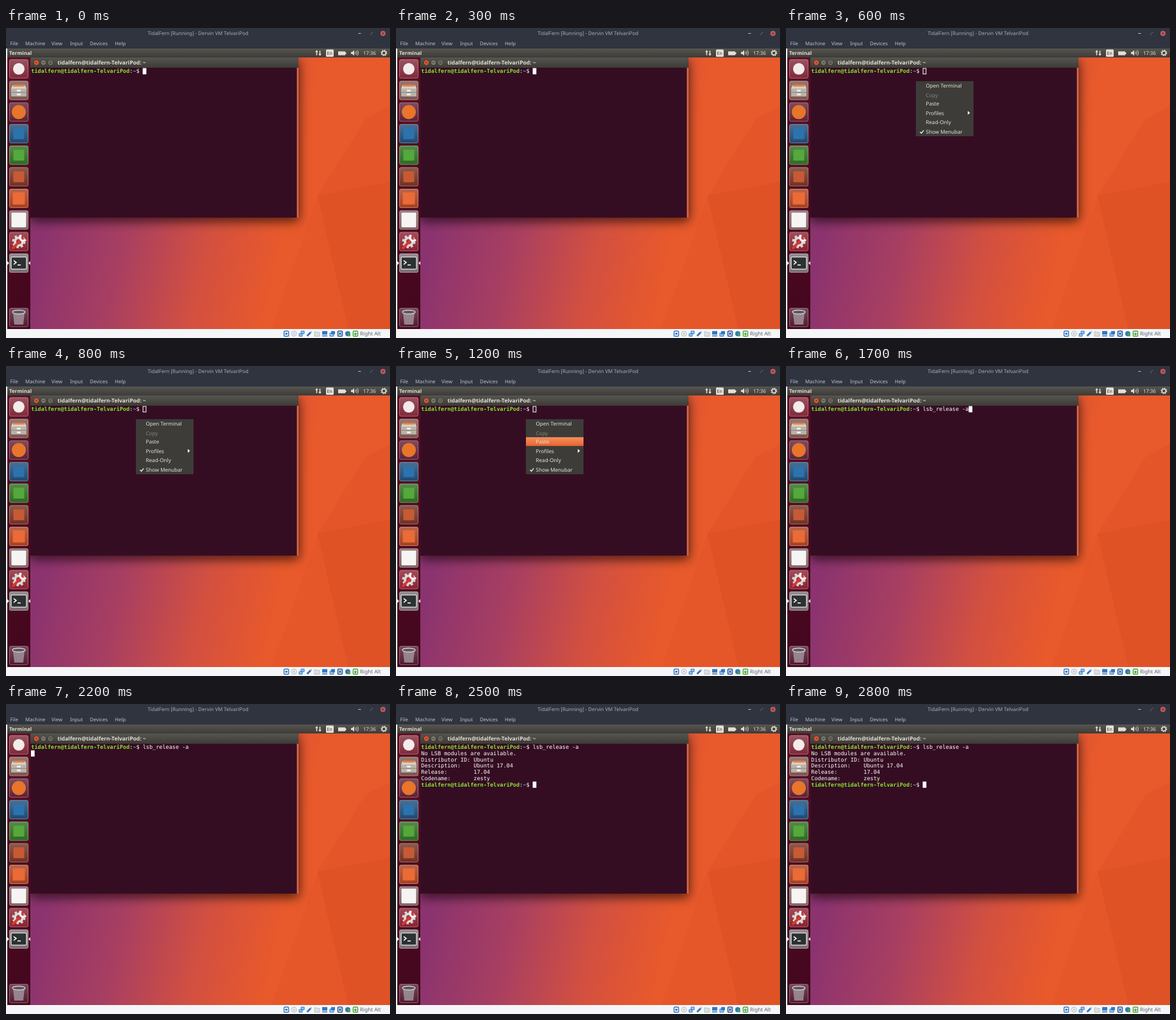
Recreate the animation shown at these times as an HTML page. Size 600 by 484 pixels, loop 2900 ms.

```html
<!DOCTYPE html>
<html lang="en">
<head>
<meta charset="utf-8">
<title>Terminal paste</title>
<style>
html, body { margin: 0; width: 100%; height: 100%; overflow: hidden; background: #f5f6f7; }
svg { display: block; }
text { font: 7.85px "Noto Sans", sans-serif; text-rendering: geometricPrecision; white-space: pre; }
.bold { font-weight: 700; }
#lines text { font: 8.53px "DejaVu Sans Mono", monospace; fill: #fff; }
#lines .user { font-weight: 700; fill: #8ae234; }
#lines .path { font-weight: 700; fill: #729fcf; }
#menu text { font-size: 8.1px; fill: #e6e2da; }
</style>
</head>
<body>
<svg width="600" height="484" viewBox="0 0 600 484">
  <defs>
    <linearGradient id="sky" gradientUnits="userSpaceOnUse" x1="40" y1="390" x2="400" y2="470">
      <stop stop-color="#8b336f"/><stop offset=".35" stop-color="#a83f61"/>
      <stop offset=".7" stop-color="#d35040"/><stop offset="1" stop-color="#e8592b"/>
    </linearGradient>
    <linearGradient id="dock" x2="0" y2="1">
      <stop stop-color="#5e0f22"/><stop offset=".5" stop-color="#4d0a20"/><stop offset="1" stop-color="#43071e"/>
    </linearGradient>
    <linearGradient id="bar" x2="0" y2="1"><stop stop-color="#575550"/><stop offset="1" stop-color="#3d3b37"/></linearGradient>
    <linearGradient id="hot" x2="0" y2="1"><stop stop-color="#f4905f"/><stop offset="1" stop-color="#e9642f"/></linearGradient>
    <linearGradient id="gloss" x2="0" y2="1">
      <stop stop-color="#fff" stop-opacity=".2"/><stop offset="1" stop-color="#fff" stop-opacity="0"/>
    </linearGradient>
    <filter id="shadow" x="-10%" y="-15%" width="120%" height="135%">
      <feDropShadow dx="0" dy="5" stdDeviation="9" flood-color="#100" flood-opacity=".75"/>
    </filter>
  </defs>

  <!-- desktop -->
  <rect x="2" y="32" width="598" height="438" fill="url(#sky)"/>
  <g fill="#b03010">
    <path d="M487 262 562 142 600 122V240Z" opacity=".08"/>
    <path d="M487 262 600 240V345Z" opacity=".16"/>
    <path d="M487 262 600 345V470H535Z" opacity=".17"/>
    <path d="M487 262 535 470H415Z" opacity=".05"/>
  </g>

  <!-- terminal window -->
  <g filter="url(#shadow)">
    <path d="M38 296V49q0-3 3-3H454q3 0 3 3V296Z" fill="#340923"/>
  </g>
  <path d="M38 62V49q0-3 3-3H454q3 0 3 3V62Z" fill="url(#bar)"/>
  <path d="M454.5 62H457V296H454.5Z" fill="#d9694a"/>
  <g stroke="#33312d" stroke-width=".8">
    <circle cx="47.5" cy="54" r="4.2" fill="#e9592f"/>
    <circle cx="58.5" cy="54" r="4.2" fill="#7b786f"/>
    <circle cx="69.5" cy="54" r="4.2" fill="#7b786f"/>
    <path d="M46 52.5l3 3m0-3-3 3M56.7 54h3.6M68 52.5h3v3h-3Z" fill="none"/>
  </g>
  <text class="bold" x="80.5" y="57" fill="#e4e0d7" style="font-size:8.5px">tidalfern@tidalfern-TelvariPod: ~</text>
  <g id="lines"></g>
  <rect id="cursor" stroke="#fff"/>

  <!-- context menu -->
  <g id="menu">
    <rect x="203" y="83" width="90" height="86" fill="#3d3c38"/>
    <rect id="hover" x="203" y="111.2" width="90" height="13.6" fill="url(#hot)"/>
    <path d="M284 129.5l3.5 3-3.5 3Z" fill="#fff"/>
    <path d="M209.5 162.3l2 2 3.5-4.5" fill="none" stroke="#fff" stroke-width="1.3"/>
  </g>

  <!-- guest panel and launcher -->
  <rect x="2" y="32" width="598" height="14" fill="url(#bar)"/>
  <text class="bold" x="5" y="41.6" fill="#e4e0d7" style="font-size:8px">Terminal</text>
  <g fill="#e4e0d7">
    <path d="M485.5 34.5l2.5 3h-1.7v5h-1.6v-5H483ZM490.5 43.5l-2.5-3h1.7v-5h1.6v5H493Z"/>
    <rect x="500" y="33.5" width="12" height="11.5" rx="1.5"/>
    <text x="501.6" y="41.8" style="font-size:7px;fill:#3d3b37">En</text>
    <path d="M519 36.5h11v1.5h1.5v3H530v1.5H519Z"/>
    <path d="M539 37.5h2l3-2.7v8.4l-3-2.7h-2Z"/>
    <path d="M545.5 37q1.5 2 0 4M547.2 35.8q2.5 3.2 0 6.4M549 34.6q3.2 4.4 0 8.8" fill="none" stroke="#e4e0d7" stroke-width=".8"/>
    <text x="558" y="41.8">17:36</text>
    <g fill="none" stroke="#e4e0d7">
      <circle cx="590.5" cy="39" r="3" stroke-width="1.4"/>
      <circle cx="590.5" cy="39" r="4.3" stroke-width="1.4" stroke-dasharray="1.7 1.68"/>
    </g>
  </g>
  <rect x="2" y="46" width="36" height="424" fill="url(#dock)"/>
  <g id="icons"></g>
  <path d="M2 364l3 3-3 3ZM38 364l-3 3 3 3Z" fill="#eee"/>

  <!-- host window frame -->
  <rect width="600" height="32" fill="#2f343f"/>
  <text x="300" y="11.3" text-anchor="middle" fill="#a8aeba">TidalFern [Running] - Dervin VM TelvariPod</text>
  <g id="hostMenu" fill="#bcc2ce"></g>
  <path d="M550.5 8.5h4M569.5 10.3l1-1M571.7 7.7l1-1" stroke="#bcc2ce"/>
  <circle cx="589" cy="8.5" r="4" fill="#cc575d"/>
  <path d="M587.5 7l3 3m0-3-3 3" stroke="#2f343f"/>

  <!-- host status bar -->
  <rect y="470" width="600" height="14" fill="#f5f6f7"/>
  <g id="status"></g>
  <text x="553" y="480" fill="#5c616c" style="font-size:8.2px">Right Alt</text>
</svg>
<script>
const $ = id => document.getElementById(id);
const LOOP = 2900;
const CELL = 5.135, LINE = 9.75, LEFT = 39.3, TOP = 70;
const T = { menu: 600, hover: 1000, paste: 1400, enter: 2000, output: 2500 };

const prompt = '<tspan class="user">tidalfern@tidalfern-TelvariPod</tspan>:<tspan class="path">~</tspan>$ ';
const command = 'lsb_release -a';
const output = ['No LSB modules are available.', 'Distributor ID: Ubuntu', 'Description:    Ubuntu 17.04',
  'Release:        17.04', 'Codename:       zesty'];

const label = (x, y, s, extra = '') => `<text x="${x}" y="${y}" ${extra}>${s}</text>`;

$('hostMenu').innerHTML = [[6.5, 'File'], [30, 'Machine'], [71, 'View'], [100, 'Input'], [131, 'Devices'], [170, 'Help']]
  .map(([x, s]) => label(x, 27.4, s)).join('');

$('menu').innerHTML += [[93, 'Open Terminal'], [108, 'Copy'], [121, 'Paste'], [135.7, 'Profiles'], [150.4, 'Read-Only'], [165.1, 'Show Menubar']]
  .map(([y, s]) => label(218.5, y, s, s === 'Copy' ? 'opacity=".42"' : '')).join('');

// Launcher tiles: background, then artwork drawn around (0, 0)
const square = (c, s = 17) => `<rect x="${-s / 2}" y="${-s / 2}" width="${s}" height="${s}" rx="1" fill="${c}"/>`;
const disc = (c, r) => `<circle r="${r}" fill="${c}"/>`;
const tiles = [
  ['#80293a', disc('#f3ecea', 9)],
  ['#7c544f', `<path d="M-10-8H10L12-3V9H-12V-3Z" fill="#d8d3cb"/><path d="M-12-3H12V9H-12Z" fill="#b9b3aa"/>
    <path d="M-12 3H12" stroke="#8c867e"/><path d="M-3-1H3V1.5H-3ZM-3 5H3V7.5H-3Z" fill="#f4f2ee"/>
    <path d="M-9-9H9V-6H-9Z" fill="#e9803f"/>`],
  ['#5c2138', disc('#e8752a', 11)],
  ['#1f4a75', square('#2c73ad')],
  ['#2f6a22', square('#55a83b')],
  ['#6f3122', square('#c75a34')],
  ['#a5401f', square('#ea6b37', 19)],
  ['#7d5c5f', square('#f6f5f4', 23)],
  ['#8c2030', `<circle r="6" fill="none" stroke="#d9d9d9" stroke-width="4"/>
    <circle r="9" fill="none" stroke="#d9d9d9" stroke-width="3" stroke-dasharray="3.6 3.47"/>
    <path d="M-9 10L6-5" stroke="#d8382c" stroke-width="4" stroke-linecap="round"/>
    <path d="M4-10A5 5 0 1 0 11-3" fill="none" stroke="#f4f4f4" stroke-width="3"/>`],
  ['#7a6b72', `<rect x="-12" y="-9.5" width="24" height="19" rx="1.5" fill="#2c3133" stroke="#d3d3d0" stroke-width="1.5"/>
    <path d="M-8-4l4 3-4 3M-2 3h5" fill="none" stroke="#fff" stroke-width="1.5"/>`],
  ['#551a30', `<path d="M-9-8L-7 11H7L9-8Z" fill="#a9a2a8" opacity=".75"/>
    <path d="M-5-6l1 15M0-6V9M5-6l-1 15" stroke="#8d828b"/>
    <ellipse cy="-8.5" rx="10" ry="3" fill="#5c555b" stroke="#d2ccd0" stroke-width="1.3"/>`]
];
$('icons').innerHTML = tiles.map(([bg, art], i) => {
  const y = i === 10 ? 452 : 63.8 + 33.7 * i;
  return `<g transform="translate(20 ${y})"><rect x="-15" y="-15" width="30" height="30" rx="3" fill="${bg}"/>
    <rect x="-14.5" y="-14.5" width="29" height="29" rx="2.5" fill="url(#gloss)" stroke="#fff" stroke-opacity=".3"/>${art}</g>`;
}).join('');

// Status indicators, drawn around (0, 0)
const blue = '#2f78c4', gray = '#b9bdc2', green = '#48a53c';
const box = (c, inner) => `<rect x="-3.5" y="-4" width="7" height="8" rx="1" fill="#fff" stroke="${c}" stroke-width="1.5"/>${inner}`;
const screen = c => `<rect x="-4" y="-4" width="8" height="5.5" fill="${c}"/><path d="M-4 3.5H4" stroke="${c}" stroke-width="1.5"/>`;
const indicators = [
  box(blue, disc(blue, 1.8)),
  `<circle r="4" fill="#eceef0" stroke="${gray}"/>${disc(gray, 1.2)}`,
  `<path d="M-1-4H4V0H-1ZM-4 0H1V4H-4Z" fill="#9cc7ee" stroke="${blue}"/>`,
  `<path d="M-3.5 3.5L2-2" stroke="${blue}" stroke-width="3"/><path d="M1-3l2 2 1.5-2-1.7-1.5Z" fill="${gray}"/>`,
  `<path d="M-4-3H-1L0-2H4V4H-4Z" fill="#dcdfe2" stroke="${gray}"/>`,
  screen(blue),
  `<path d="M-4-1H2V4H-4Z" fill="#9cc7ee" stroke="${blue}"/><path d="M-2-4H4V1H-2Z" fill="${blue}"/>`,
  box('#24579c', '<path d="M-2-2L2 2M2-2L-2 2" stroke="#24579c" stroke-width="1.3"/>'),
  `${disc(blue, 4)}<path d="M0-2L4 0V4H0Z" fill="${green}"/>`,
  box(green, `<path d="M0-2.5V1M-2 0L0 2.5 2 0Z" fill="${green}" stroke="${green}"/>`)
];
$('status').innerHTML = indicators.map((art, i) => `<g transform="translate(${438 + 12 * i} 477.2)">${art}</g>`).join('');

function setCursor(col, row, hollow) {
  const inset = hollow ? .5 : 0;
  const shape = {
    x: LEFT + col * CELL + inset - .3, y: 62.6 + row * LINE + inset,
    width: CELL - 2 * inset + .6, height: 9.7 - 2 * inset,
    fill: hollow ? 'none' : '#fff', 'stroke-width': hollow ? 1 : 0
  };
  for (const key in shape) $('cursor').setAttribute(key, shape[key]);
}

function draw(t) {
  const menuOpen = t >= T.menu && t < T.paste;
  const lines = [prompt + (t >= T.paste ? command : '')];
  if (t >= T.output) lines.push(...output, prompt);
  $('lines').innerHTML = lines.map((s, i) => label(LEFT, TOP + i * LINE, s)).join('');

  $('menu').style.display = menuOpen ? '' : 'none';
  $('hover').style.display = t >= T.hover ? '' : 'none';

  if (t >= T.output) setCursor(34, 6);
  else if (t >= T.enter) setCursor(0, 1);
  else setCursor(t >= T.paste ? 34 + command.length : 34, 0, menuOpen);
}

function tick() {
  draw(performance.now() % LOOP);
  requestAnimationFrame(tick);
}
tick();
</script>
</body>
</html>
```
